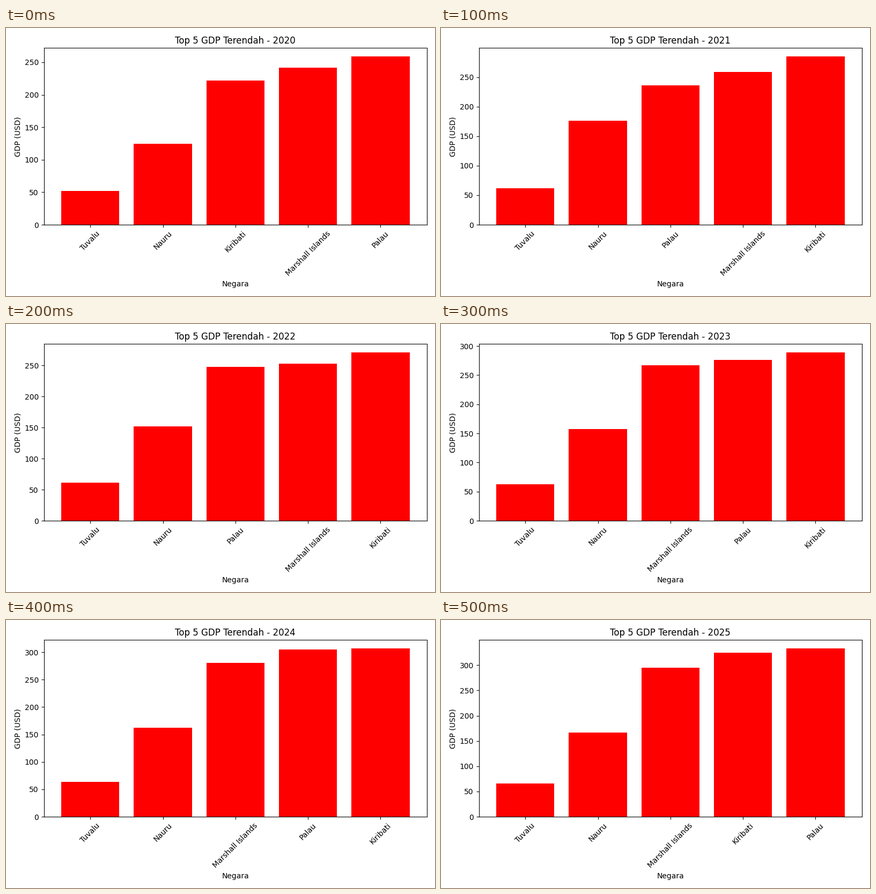
Recreate the animation shown at these times as a matplotlib script. Size 800x500 px, loop 600 ms.

```python
import matplotlib.pyplot as plt
from matplotlib.animation import FuncAnimation

FIRST_YEAR = 2020
YEARS = 6

# Opening values per country, then a steady yearly growth from the last of them
ECONOMIES = {
    "Tuvalu": ((52, 62, 61), 1.5),
    "Nauru": ((125, 176, 152), 5),
    "Kiribati": ((222, 285, 271), 18),
    "Marshall Islands": ((242, 259, 253), 14),
    "Palau": ((259, 236, 248), 28.4),
}

fig, ax = plt.subplots(figsize=(8, 5), dpi=100)


def gdp(country, year):
    opening, growth = ECONOMIES[country]
    last = len(opening) - 1
    return opening[min(year, last)] + growth * max(0, year - last)


def draw_year(year):
    names = sorted(ECONOMIES, key=lambda country: gdp(country, year))
    ax.clear()
    ax.bar(names, [gdp(name, year) for name in names], color="red")
    ax.set_title(f"Top 5 GDP Terendah - {FIRST_YEAR + year}")
    ax.set_xlabel("Negara")
    ax.set_ylabel("GDP (USD)")
    ax.tick_params(axis="x", rotation=45)
    fig.tight_layout()


anim = FuncAnimation(fig, draw_year, frames=YEARS, interval=100, repeat=True)
plt.show()
```
